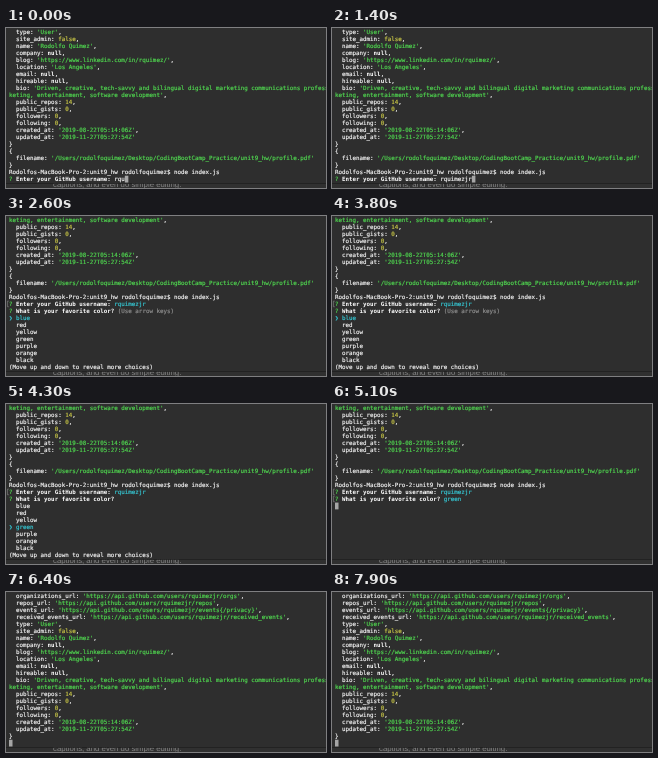
Write an HTML page with a canvas that moves like this. It is 320 px wide and 160 px high and loops after 8000 ms.

```html
<!DOCTYPE html>
<html lang="en">
<head>
<meta charset="utf-8">
<title>Terminal session</title>
<style>
  html, body { margin: 0; width: 100%; height: 100%; overflow: hidden; background: #2e2e2e; }
  canvas { display: block; width: 320px; height: 160px; }
</style>
</head>
<body>
<canvas id="stage"></canvas>
<script>
const W = 320, H = 160, LOOP = 8000;
const ROWS = 22, PITCH = 7.02, TOP = 3.7, LEFT = 3, ADVANCE = 3.51, BOTTOM = 155;
const FONT_SIZE = ADVANCE / 0.602;

const C = {
  back: '#2e2e2e', page: '#303030', edge: '#1e1e1e', pageText: '#858585',
  text: '#eeeeee', bold: '#ffffff', dim: '#8c8c8c', cursor: '#a6a6a6',
  green: '#4fd44f', yellow: '#c6c446', cyan: '#35c3cf'
};

const USER = 'rquimezjr';
const API = 'https://api.github.com/users/' + USER;

const canvas = document.getElementById('stage');
const ctx = canvas.getContext('2d');
const ratio = window.devicePixelRatio || 1;
canvas.width = W * ratio;
canvas.height = H * ratio;

const span = (text, color = C.text, bold = false) => ({ text, color, bold });

// Colours one line of inspected object output.
function inspect(line) {
  const spans = [];
  for (const [text] of line.matchAll(/'[^']*'?|\bnull\b|\bfalse\b|\b\d+\b|[^'\s]+?(?=[\s,']|$)|[\s,]+/g)) {
    if (text[0] === "'") spans.push(span(text, C.green));
    else if (text === 'null') spans.push(span(text, C.bold, true));
    else if (/^(false|\d+)$/.test(text)) spans.push(span(text, C.yellow));
    else spans.push(span(text));
  }
  return { spans };
}

const profile = [
  `  organizations_url: '${API}/orgs',`,
  `  repos_url: '${API}/repos',`,
  `  events_url: '${API}/events{/privacy}',`,
  `  received_events_url: '${API}/received_events',`,
  "  type: 'User',",
  '  site_admin: false,',
  "  name: 'Rodolfo Quimez',",
  '  company: null,',
  "  blog: 'https://www.linkedin.com/in/rquimez/',",
  "  location: 'Los Angeles',",
  '  email: null,',
  '  hireable: null,',
  "  bio: 'Driven, creative, tech-savvy and bilingual digital marketing communications professional in mar",
  '',
  '  public_repos: 14,',
  '  public_gists: 0,',
  '  followers: 0,',
  '  following: 0,',
  "  created_at: '2019-08-22T05:14:06Z',",
  "  updated_at: '2019-11-27T05:27:54Z'",
  '}'
].map(inspect);
profile[13] = { spans: [span("keting, entertainment, software development'", C.green), span(',')] };

const history = profile.concat([
  '{',
  "  filename: '/Users/rodolfoquimez/Desktop/CodingBootCamp_Practice/unit9_hw/profile.pdf'",
  '}'
].map(inspect), {
  spans: [span('Rodolfos-MacBook-Pro-2:unit9_hw rodolfoquimez$ node index.js')]
});

const question = (title, answer, mark = false) => ({
  spans: [span('? ', C.green), span(title + ' ', C.bold, true), answer],
  mark
});
const blank = { spans: [] };
const cursorLine = { spans: [], cursor: true };

const KEYS = [100, 300, 500, 700, 1100, 1300];
const ENTER_NAME = 1500, ENTER_COLOR = 4700, OUTPUT = 5200;
const MOVES = [3900, 4100, 4300];
const COLORS = ['blue', 'red', 'yellow', 'green', 'purple', 'orange', 'black'];

const passed = (times, t) => times.filter(at => t >= at).length;

function screen(t) {
  if (t >= OUTPUT) return [...profile, cursorLine];

  const nameTitle = 'Enter your GitHub username:';
  if (t < ENTER_NAME) {
    const typed = USER.slice(0, 3 + passed(KEYS, t));
    return [...history, { ...question(nameTitle, span(typed)), cursor: true }];
  }

  const lines = [...history, question(nameTitle, span(USER, C.cyan), true)];
  const colorTitle = 'What is your favorite color?';
  if (t >= ENTER_COLOR) {
    lines.push(question(colorTitle, span('green', C.cyan), true), cursorLine);
    return lines.concat(Array(COLORS.length).fill(blank));
  }

  const selected = passed(MOVES, t);
  const hint = selected ? span('') : span('(Use arrow keys)', C.dim);
  lines.push(question(colorTitle, hint));
  COLORS.forEach((name, i) => lines.push({
    spans: [i === selected ? span('❯ ' + name, C.cyan) : span('  ' + name)]
  }));
  lines.push({ spans: [span('(Move up and down to reveal more choices)')] });
  return lines;
}

function drawText({ text, color, bold }, col, y) {
  ctx.font = `${bold ? 'bold ' : ''}${FONT_SIZE}px "DejaVu Sans Mono", monospace`;
  ctx.fillStyle = ctx.strokeStyle = color;
  ctx.lineWidth = 0.2;
  // Words sit on the character grid; a hairline gives the glyphs their weight.
  for (const word of text.matchAll(/\S+/g)) {
    const x = LEFT + (col + word.index) * ADVANCE;
    ctx.fillText(word[0], x, y);
    if (!bold) ctx.strokeText(word[0], x, y);
  }
}

function drawCursor(col, y) {
  ctx.fillStyle = C.cursor;
  ctx.fillRect(LEFT + col * ADVANCE, y - 3.4, ADVANCE, 6.8);
}

function drawMark(y) {
  ctx.strokeStyle = C.dim;
  ctx.lineWidth = 0.6;
  ctx.beginPath();
  ctx.moveTo(2.8, y - 2.8);
  ctx.lineTo(1.4, y - 2.8);
  ctx.lineTo(1.4, y + 2.8);
  ctx.lineTo(2.8, y + 2.8);
  ctx.stroke();
}

function drawLine(line, row) {
  const y = TOP + row * PITCH;
  let col = 0;
  if (line.mark) drawMark(y);
  for (const part of line.spans) {
    drawText(part, col, y + FONT_SIZE * 0.34);
    col += part.text.length;
  }
  if (line.cursor) drawCursor(col, y);
}

// The page behind the terminal window shows below its bottom edge.
function drawPage() {
  ctx.fillStyle = C.page;
  ctx.fillRect(0, 0, W, H);
  ctx.fillStyle = C.pageText;
  ctx.font = '7.8px "Liberation Sans", Arial, sans-serif';
  ctx.fillText('captions, and even do simple editing.', 47, 159.2);
  ctx.fillStyle = C.edge;
  ctx.fillRect(0, BOTTOM, W, 0.8);
}

function draw(t) {
  ctx.setTransform(ratio, 0, 0, ratio, 0, 0);
  ctx.textRendering = 'geometricPrecision';
  drawPage();
  ctx.fillStyle = C.back;
  ctx.fillRect(0, 0, W, BOTTOM);
  screen(t).slice(-ROWS).forEach(drawLine);
}

const start = performance.now();
function tick() {
  draw((performance.now() - start) % LOOP);
  requestAnimationFrame(tick);
}
tick();
</script>
</body>
</html>
```
